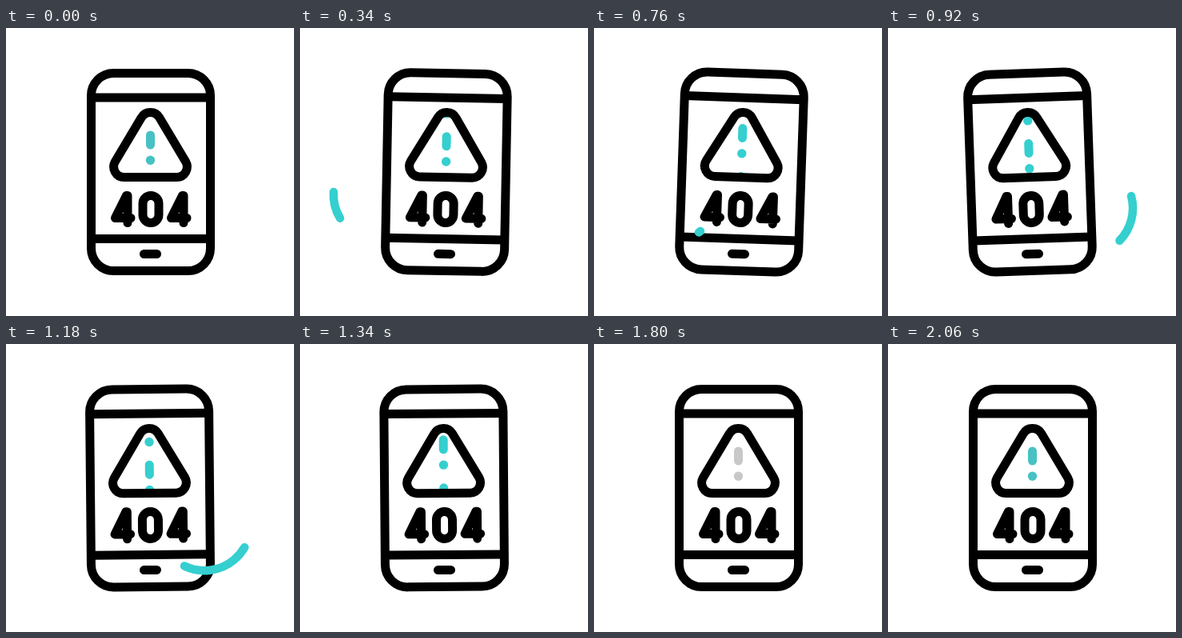
Recreate the animation shown at these times as an HTML page. Size 360x360 px, loop 2.24 s.

```html
<!DOCTYPE html>
<html lang="en">
<head>
<meta charset="utf-8">
<title>404 phone</title>
<style>
  html, body { margin: 0; width: 100%; height: 100%; overflow: hidden; background: #fff; }
  svg { display: block; width: 100%; height: 100%; }
  .line { fill: none; stroke: #000; stroke-width: 11; stroke-linecap: round; stroke-linejoin: round; }
  .arc { fill: none; stroke: #35cfcf; stroke-width: 10.5; stroke-linecap: round; }
</style>
</head>
<body>
<svg viewBox="0 0 360 360">
  <defs>
    <path id="tri" d="M147.5 186.5H213.5A13 13 0 0 0 224.6 167L191.8 112A13 13 0 0 0 169.2 112L136.4 167A13 13 0 0 0 147.5 186.5Z"/>
    <clipPath id="inside"><use href="#tri"/></clipPath>
    <g id="mark">
      <path d="M180.5 134V146" fill="none" stroke="currentColor" stroke-width="11" stroke-linecap="round"/>
      <circle cx="180.5" cy="165.3" r="5.7" fill="currentColor"/>
    </g>
    <path id="four" d="M152 243.5V209.5H150.5L136.5 237.5H156"/>
  </defs>
  <g id="phone">
    <g clip-path="url(#inside)">
      <g id="marks">
        <use href="#mark"/>
        <use href="#mark" y="-60"/>
      </g>
    </g>
    <g class="line">
      <rect x="106.5" y="56.5" width="149" height="247" rx="28"/>
      <path d="M107 87H255M107 263.5H255M172.5 282.5H188.5"/>
      <use href="#tri"/>
      <use href="#four"/>
      <rect x="171" y="209.5" width="20" height="34" rx="10"/>
      <use href="#four" x="70"/>
    </g>
  </g>
  <path id="left" class="arc" pathLength="1" d="M42 205A57 57 0 0 0 133 254"/>
  <path id="right" class="arc" pathLength="1" d="M304 210A58 58 0 0 1 223 277.5"/>
</svg>
<script>
const LOOP = 2240, SPACING = 60;
const TEAL = [53, 207, 207], REST = [72, 193, 196], GRAY = [200, 200, 200];
const $ = id => document.getElementById(id);
const phone = $('phone'), marks = $('marks'), left = $('left'), right = $('right');

// time, angle
const swing = [[255, 0], [420, 2], [585, -2], [752, 2], [918, -2], [1085, 2], [1248, -2], [1385, 0]];
// time, distance, speed
const scroll = [[255, 0, 0], [520, 22, .2], [760, 111, .47], [920, 190, .42], [1180, 257, .18], [1500, 300, 0]];
// time, colour
const tint = [[240, REST], [280, TEAL], [1400, TEAL], [1540, GRAY], [1860, GRAY], [2060, REST]];

const clamp = x => Math.min(1, Math.max(0, x));
const smooth = x => (x = clamp(x), x * x * (3 - 2 * x));
const mix = (a, b, k) => a + (b - a) * k;

function segment(keys, t) {
  let i = 0;
  while (i < keys.length - 2 && t >= keys[i + 1][0]) i++;
  const a = keys[i], b = keys[i + 1];
  return [a, b, clamp((t - a[0]) / (b[0] - a[0]))];
}

function angleAt(t) {
  const [a, b, k] = segment(swing, t);
  return mix(a[1], b[1], (1 - Math.cos(Math.PI * k)) / 2);
}

function distanceAt(t) {
  const [a, b, k] = segment(scroll, t);
  const span = b[0] - a[0], r = 1 - k;
  return mix(a[1], b[1], smooth(k)) + span * k * r * (a[2] * r - b[2] * k);
}

function colourAt(t) {
  const [a, b, k] = segment(tint, t);
  return `rgb(${a[1].map((c, i) => Math.round(mix(c, b[1][i], k)))})`;
}

function drawArc(el, t) {
  const head = smooth(t / 300), tail = smooth((t - 310) / 230);
  el.style.visibility = t >= 20 && t < 540 ? 'visible' : 'hidden';
  el.setAttribute('stroke-dasharray', `${Math.max(.001, head - tail)} 3`);
  el.setAttribute('stroke-dashoffset', -Math.min(tail, .998));
}

function draw(t) {
  phone.setAttribute('transform', `rotate(${angleAt(t)} 180.5 282)`);
  marks.setAttribute('transform', `translate(0 ${distanceAt(t) % SPACING})`);
  marks.style.color = colourAt(t);
  drawArc(left, t - 240);
  drawArc(right, t - 780);
}

const start = performance.now();
function tick() {
  draw((performance.now() - start) % LOOP);
  requestAnimationFrame(tick);
}
tick();
</script>
</body>
</html>
```
